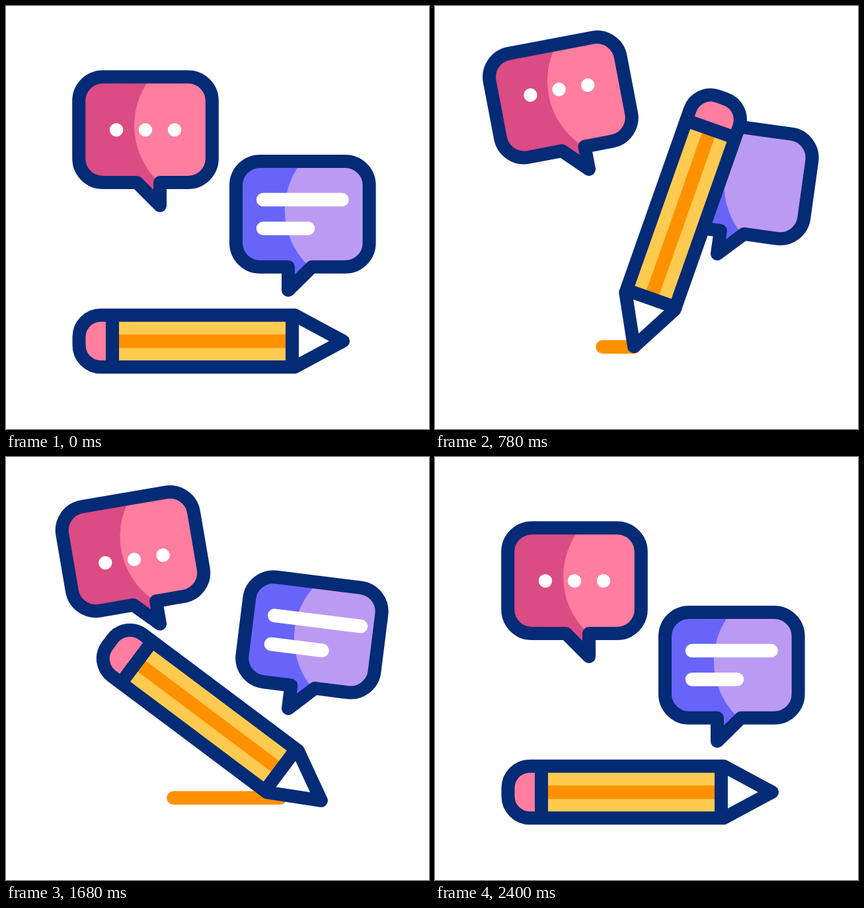
Animation, 640 px wide and 640 px high, one loop 2420 ms. Source, as an HTML page:

```html
<!DOCTYPE html>
<html lang="en">
<head>
<meta charset="utf-8">
<title>Pencil and speech bubbles</title>
<style>
  html, body { margin: 0; width: 100%; height: 100%; overflow: hidden; background: #fff; }
  svg { display: block; width: 100vw; height: 100vh; }
  .outline { fill: none; stroke: #042b76; stroke-width: 20; stroke-linejoin: round; stroke-linecap: round; }
  .bar { fill: none; stroke: #fff; stroke-width: 20.5; stroke-linecap: round; }
</style>
</head>
<body>
<svg viewBox="0 0 640 640">
  <defs>
    <path id="pinkShape" d="M146.5 107.3H275.5a36.3 36.3 0 0 1 36.3 36.3V230.7a36.3 36.3 0 0 1-36.3 36.3H233V302L198 267H146.5a36.3 36.3 0 0 1-36.3-36.3V143.6a36.3 36.3 0 0 1 36.3-36.3z"/>
    <path id="violetShape" d="M384.3 235H513.3a36.3 36.3 0 0 1 36.3 36.3V358.4a36.3 36.3 0 0 1-36.3 36.3H463L427 430V394.7H384.3a36.3 36.3 0 0 1-36.3-36.3V271.3a36.3 36.3 0 0 1 36.3-36.3z"/>
    <path id="pencilShape" d="M143.5 467.7H437L510 507 437 546.3H143.5a33 33 0 0 1-33-33V500.7a33 33 0 0 1 33-33z"/>
    <clipPath id="pinkClip"><use href="#pinkShape"/></clipPath>
    <clipPath id="violetClip"><use href="#violetShape"/></clipPath>
    <clipPath id="pencilClip"><use href="#pencilShape"/></clipPath>
  </defs>

  <path id="stroke" fill="none" stroke="#ff9100" stroke-width="20.5" stroke-linecap="round"/>

  <g id="pink">
    <use href="#pinkShape" fill="#db4b84"/>
    <circle cx="311" cy="181" r="117" fill="#ff7d9f" clip-path="url(#pinkClip)"/>
    <use href="#pinkShape" class="outline"/>
    <g fill="#fff">
      <circle class="dot" cx="167" cy="187.5" r="10.2"/>
      <circle class="dot" cx="211" cy="187.5" r="10.2"/>
      <circle class="dot" cx="255" cy="187.5" r="10.2"/>
    </g>
  </g>

  <g id="violet">
    <use href="#violetShape" fill="#6864fa"/>
    <circle cx="538.8" cy="309" r="117" fill="#bb9af3" clip-path="url(#violetClip)"/>
    <use href="#violetShape" class="outline"/>
    <path id="longBar" class="bar"/>
    <path id="shortBar" class="bar"/>
  </g>

  <g id="pencil">
    <g clip-path="url(#pencilClip)">
      <path d="M100 457h61v100h-61z" fill="#ff7d9f"/>
      <path d="M161 457h272v100H161z" fill="#fecb50"/>
      <path d="M161 497h272v20.5H161z" fill="#ff9100"/>
      <path d="M433 457h87v100h-87z" fill="#fff"/>
    </g>
    <use href="#pencilShape" class="outline"/>
    <path class="outline" d="M161 468V546M433 468V546"/>
  </g>
</svg>
<script>
const LOOP = 2420, LAST = 2400;
const $ = id => document.getElementById(id);
const dots = document.querySelectorAll('.dot');
const lerp = (a, b, p) => a + (b - a) * p;

// Eased progress from time a to time b
function ease(t, a, b) {
  const u = Math.min(1, Math.max(0, (t - a) / (b - a)));
  return u * u * (3 - 2 * u);
}

// Eased value through a list of key times
function keyed(t, times, values) {
  let i = 0;
  while (i < times.length - 2 && t >= times[i + 1]) i++;
  return lerp(values[i], values[i + 1], ease(t, times[i], times[i + 1]));
}

function place(el, dx, dy, angle, px, py) {
  el.setAttribute('transform', `translate(${dx} ${dy}) rotate(${angle} ${px} ${py})`);
}

function drawLine(el, x1, x2, y) {
  el.setAttribute('d', x2 - x1 > 0.3 ? `M${x1} ${y}H${x2}` : '');
}

function drawBubbles(t) {
  const lift = keyed(t, [0, 1200, 2400], [0, 1, 0]);
  place($('pink'), 0, -76.5 * lift, -15 * lift, 233, 302);
  place($('violet'), 0, -76.5 * lift, 11 * lift, 427, 430);

  dots.forEach((dot, i) => {
    const times = [0, 720, 1440, 2160].map(k => k + i * 120);
    dot.setAttribute('cy', 187.5 + keyed(t, times, [0, -12.8, 12.8, 0]));
  });

  const long = keyed(t, [360, 890, 1650, 2190], [119.5, 0, 132, 119.5]);
  const short = keyed(t, [200, 740, 1520, 2060], [68, 0, 81, 68]);
  drawLine($('longBar'), 389, 389 + long, 293);
  drawLine($('shortBar'), 389, 389 + short, 336.5);
}

function drawPencil(t) {
  const times = [0, 446, 1310, 2010], pivot = { x: 451, y: 507 }, reach = 59;
  const angle = keyed(t, times, [0, 123.7, 81, 0]);
  const x = keyed(t, times, [pivot.x, 278.8, 404.1, pivot.x]);
  const dip = 18 * Math.sin(Math.PI * ease(t, 0, 446)) ** 2;
  const y = keyed(t, times, [pivot.y, 460.9, 457.4, pivot.y]) + dip;
  place($('pencil'), x - pivot.x, y - pivot.y, angle, pivot.x, pivot.y);

  const tip = x + reach * Math.cos(angle * Math.PI / 180);
  const end = t < 446 ? 0 : t < 1310 ? Math.min(tip, 414.5) : 414.5;
  drawLine($('stroke'), lerp(253.5, 414.5, ease(t, 1680, 1900)), end, 515.7);
}

function frame() {
  const t = Math.min(performance.now() % LOOP, LAST);
  drawBubbles(t);
  drawPencil(t);
  requestAnimationFrame(frame);
}
frame();
</script>
</body>
</html>
```
